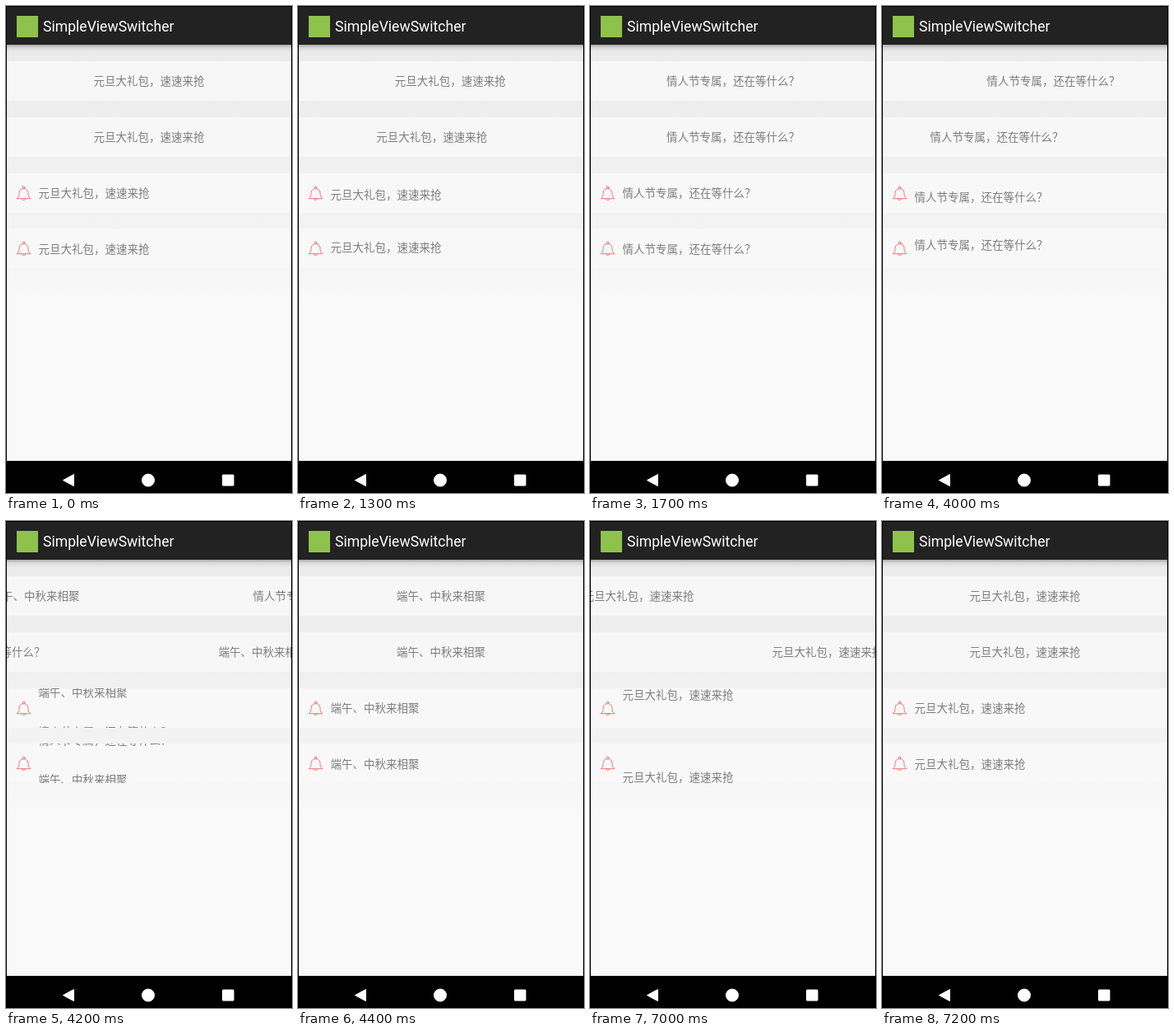
Write an HTML page that moves like this. It is 348 px wide and 591 px high and loops after 8000 ms.

```html
<!DOCTYPE html>
<html lang="zh-CN">
<head>
<meta charset="utf-8">
<title>SimpleViewSwitcher</title>
<style>
  html, body { margin: 0; width: 100%; height: 100%; overflow: hidden; background: #000; }
  #stage { display: block; }
  .title { font: 17.6px Roboto, sans-serif; fill: #fff; }
  .notice { font: 13.5px "Noto Sans CJK SC", "Noto Sans CJK", sans-serif; fill: #7d7d7d; }
  .bell { fill: none; stroke: #f4636a; stroke-width: .9; stroke-linecap: round; stroke-linejoin: round; }
</style>
</head>
<body>
<svg id="stage" width="348" height="591" viewBox="0 0 348 591">
  <defs>
    <linearGradient id="page" gradientUnits="userSpaceOnUse" x1="0" y1="48" x2="0" y2="360">
      <stop offset="0" stop-color="#ebebeb"/>
      <stop offset=".3" stop-color="#eeeeee"/>
      <stop offset=".7" stop-color="#f3f3f3"/>
      <stop offset="1" stop-color="#f9f9f9"/>
    </linearGradient>
    <linearGradient id="shadow" x1="0" y1="0" x2="0" y2="1">
      <stop offset="0" stop-opacity=".28"/>
      <stop offset=".4" stop-opacity=".08"/>
      <stop offset="1" stop-opacity="0"/>
    </linearGradient>
    <g id="bell" class="bell">
      <circle cx="20.5" cy="17.3" r="1.3"/>
      <path d="M12.4 30.5 C14.6 29 15 27.4 15 24.6 C15 20.6 17.2 18.7 20.5 18.7 C23.8 18.7 26 20.6 26 24.6 C26 27.4 26.4 29 28.6 30.5 Z"/>
      <path d="M18.3 30.7 C18.6 33.4 22.4 33.4 22.7 30.7"/>
    </g>
  </defs>

  <rect width="348" height="591" fill="#000"/>
  <rect x="1" y="47" width="346" height="505" fill="url(#page)"/>
  <rect x="1" y="47" width="346" height="9" fill="url(#shadow)"/>
  <rect x="1" y="1" width="346" height="46" fill="#222"/>
  <rect x="13" y="12" width="26" height="26" fill="#8fc24c"/>
  <text class="title" x="45" y="31">SimpleViewSwitcher</text>

  <g id="rows"></g>

  <g fill="#fff" stroke="#fff" stroke-linejoin="round">
    <path d="M69.5 575.5 L82.5 568.5 V582.5 Z"/>
    <circle cx="173" cy="575.5" r="7.5"/>
    <rect x="263.5" y="569" width="13.5" height="13" rx=".5"/>
  </g>
</svg>
<script>
  const LOOP = 8000, TICK = 100, SLIDE = 400;
  const WIDTH = 346, HEIGHT = 48;
  const notices = ['元旦大礼包，速速来抢', '情人节专属，还在等什么？', '端午、中秋来相聚'];

  // lead: how far the slide has already run when its first step appears
  const switches = [
    { start: 1300, lead: 13 },
    { start: 4000, lead: 40 },
    { start: 6800, lead: 67 },
  ];

  const rowSpecs = [
    { y: 67, dx: WIDTH, dy: 0, fill: '#f7f7f7' },
    { y: 135, dx: -WIDTH, dy: 0, fill: '#f7f7f7' },
    { y: 203, dx: 0, dy: HEIGHT, fill: '#f8f8f8', bell: true, baseline: 29 },
    { y: 270, dx: 0, dy: -HEIGHT, fill: '#f8f8f8', bell: true, baseline: 30 },
  ];

  function add(parent, tag, attrs) {
    const node = document.createElementNS('http://www.w3.org/2000/svg', tag);
    for (const key in attrs) node.setAttribute(key, attrs[key]);
    return parent.appendChild(node);
  }

  function buildRow({ y, dx, dy, fill, bell, baseline = 29 }) {
    const row = add(document.getElementById('rows'), 'svg',
      { x: 1, y, width: WIDTH, height: HEIGHT, overflow: 'hidden' });
    add(row, 'rect', { width: WIDTH, height: HEIGHT, fill });
    if (bell) add(row, 'use', { href: '#bell' });
    const makeText = () => add(row, 'text', {
      class: 'notice', x: bell ? 38.5 : WIDTH / 2, y: baseline,
      'text-anchor': bell ? 'start' : 'middle',
    });
    return { dx, dy, leaving: makeText(), entering: makeText() };
  }

  const rows = rowSpecs.map(buildRow);

  function place(node, text, row, shift) {
    if (node.textContent !== text) node.textContent = text;
    node.setAttribute('transform', `translate(${row.dx * shift} ${row.dy * shift})`);
  }

  function draw(time) {
    let index = 0, progress = 1;
    switches.forEach(({ start, lead }, i) => {
      if (time < start) return;
      const elapsed = Math.floor((time - start) / TICK) * TICK + lead;
      index = i + 1;
      progress = Math.min(1, elapsed / SLIDE);
    });
    const count = notices.length;
    const previous = notices[(index + count - 1) % count];
    const current = notices[index % count];
    for (const row of rows) {
      place(row.leaving, previous, row, progress);
      place(row.entering, current, row, progress - 1);
    }
  }

  const origin = performance.now();
  function frame() {
    draw((performance.now() - origin) % LOOP);
    requestAnimationFrame(frame);
  }
  frame();
</script>
</body>
</html>
```
